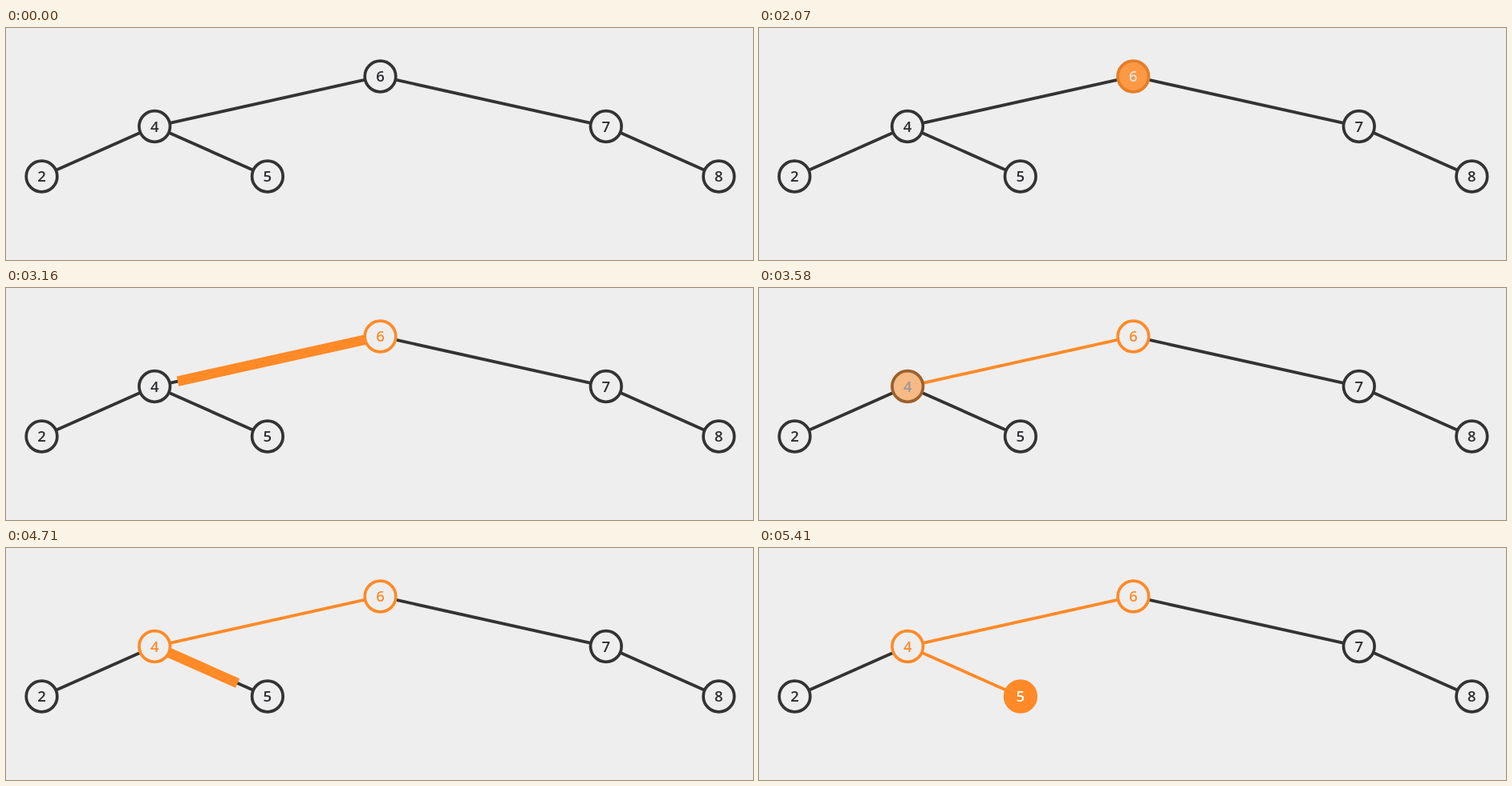
These frames come from a looping animation (931x290 px, 6.22 s). An HTML page:

```html
<!DOCTYPE html>
<html lang="en">
<head>
<meta charset="utf-8">
<title>Tree search</title>
<style>
  html, body { margin: 0; width: 100%; height: 100%; overflow: hidden; background: #eee; }
  svg { display: block; width: 931px; height: 290px; }
  line { stroke-width: 3.8; }
  circle { stroke-width: 3.7; }
  text { font: 600 18.5px "Open Sans", "Noto Sans", sans-serif; text-anchor: middle; }
</style>
</head>
<body>
<svg id="stage" viewBox="0 0 931 290"></svg>
<script>
const LOOP = 6220, SPAN = 475, R = 19.3;
const DARK = [51, 51, 51], INK = [44, 44, 50], ORANGE = [255, 138, 39];
const PAPER = [238, 238, 238], WHITE = [255, 255, 255];

// Moments at which the picture advances
const STEPS = [0, 1680, 1830, 1950, 2070, 2190, 2310, 2460, 2610, 2730, 2890,
  3040, 3160, 3310, 3460, 3580, 3740, 3890, 4010, 4160, 4280, 4430, 4550,
  4710, 4860, 5010, 5140, 5290, 5410];

// fill: node turns solid orange; clear: its inside empties again
const nodes = {
  6: { x: 466.5, y: 60.5, fill: 1750, clear: 2290 },
  4: { x: 185.2, y: 123, fill: 3340, clear: 3880 },
  7: { x: 747.8, y: 123 },
  2: { x: 44.5, y: 185.5 },
  5: { x: 325.9, y: 185.5, fill: 4945 },
  8: { x: 888.4, y: 185.5 }
};
const edges = [
  { from: 6, to: 4, start: 2788 },
  { from: 6, to: 7 },
  { from: 4, to: 2 },
  { from: 4, to: 5, start: 4406 },
  { from: 7, to: 8 }
];

const stage = document.getElementById("stage");
const add = (tag, parent = stage) =>
  parent.appendChild(document.createElementNS("http://www.w3.org/2000/svg", tag));
const set = (el, attrs) => {
  for (const key in attrs) el.setAttribute(key, attrs[key]);
};
const mix = (a, b, p) => `rgb(${a.map((v, i) => Math.round(v + (b[i] - v) * p))})`;
const ease = p => p < 0.5 ? 4 * p ** 3 : 1 - 4 * (1 - p) ** 3;
const progress = (t, start, span = SPAN) =>
  start === undefined ? 0 : ease(Math.min(1, Math.max(0, (t - start) / span)));

for (const e of edges) {
  e.base = add("line");
  e.trail = add("line");
  set(e.trail, { stroke: mix(ORANGE, ORANGE, 0), style: "stroke-width:12.5" });
}
for (const [label, n] of Object.entries(nodes)) {
  n.ring = add("circle");
  n.text = add("text");
  n.text.textContent = label;
  set(n.ring, { r: R, cy: n.y });
  set(n.text, { y: n.y + 6.6 });
}

function drawEdge(e, t) {
  const a = nodes[e.from], b = nodes[e.to];
  const dx = b.cx - a.cx, dy = b.y - a.y, len = Math.hypot(dx, dy);
  const at = d => [a.cx + dx * d / len, a.y + dy * d / len];
  const line = (el, d) => {
    const [x1, y1] = at(R), [x2, y2] = at(d);
    set(el, { x1, y1, x2, y2 });
  };
  const done = t >= e.start + SPAN + 30;
  const p = progress(t, e.start);
  line(e.base, len - R);
  line(e.trail, R + (len - 2 * R) * p);
  set(e.base, { stroke: mix(DARK, ORANGE, done ? 1 : 0) });
  set(e.trail, { visibility: p > 0 && !done ? "visible" : "hidden" });
}

function drawNode(n, t) {
  const p = progress(t, n.fill), q = progress(t, n.clear);
  set(n.ring, {
    cx: n.cx,
    stroke: mix(DARK, ORANGE, p),
    fill: q > 0 ? mix(ORANGE, PAPER, q) : mix(PAPER, ORANGE, p)
  });
  set(n.text, {
    x: n.cx,
    fill: q > 0 ? mix(WHITE, ORANGE, q) : mix(INK, WHITE, p)
  });
}

function draw(t) {
  // The tree widens slightly to the left, then settles back
  const shift = t < 1680 ? 0 : 0.95 * (1 - progress(t, 1680, 630));
  const list = Object.values(nodes);
  for (const n of list) n.cx = n.x - shift * (888.4 - n.x) / 844;
  for (const e of edges) drawEdge(e, t);
  for (const n of list) drawNode(n, t);
}

function tick() {
  const t = performance.now() % LOOP;
  draw(STEPS.filter(s => s <= t).pop());
  requestAnimationFrame(tick);
}
tick();
</script>
</body>
</html>
```
